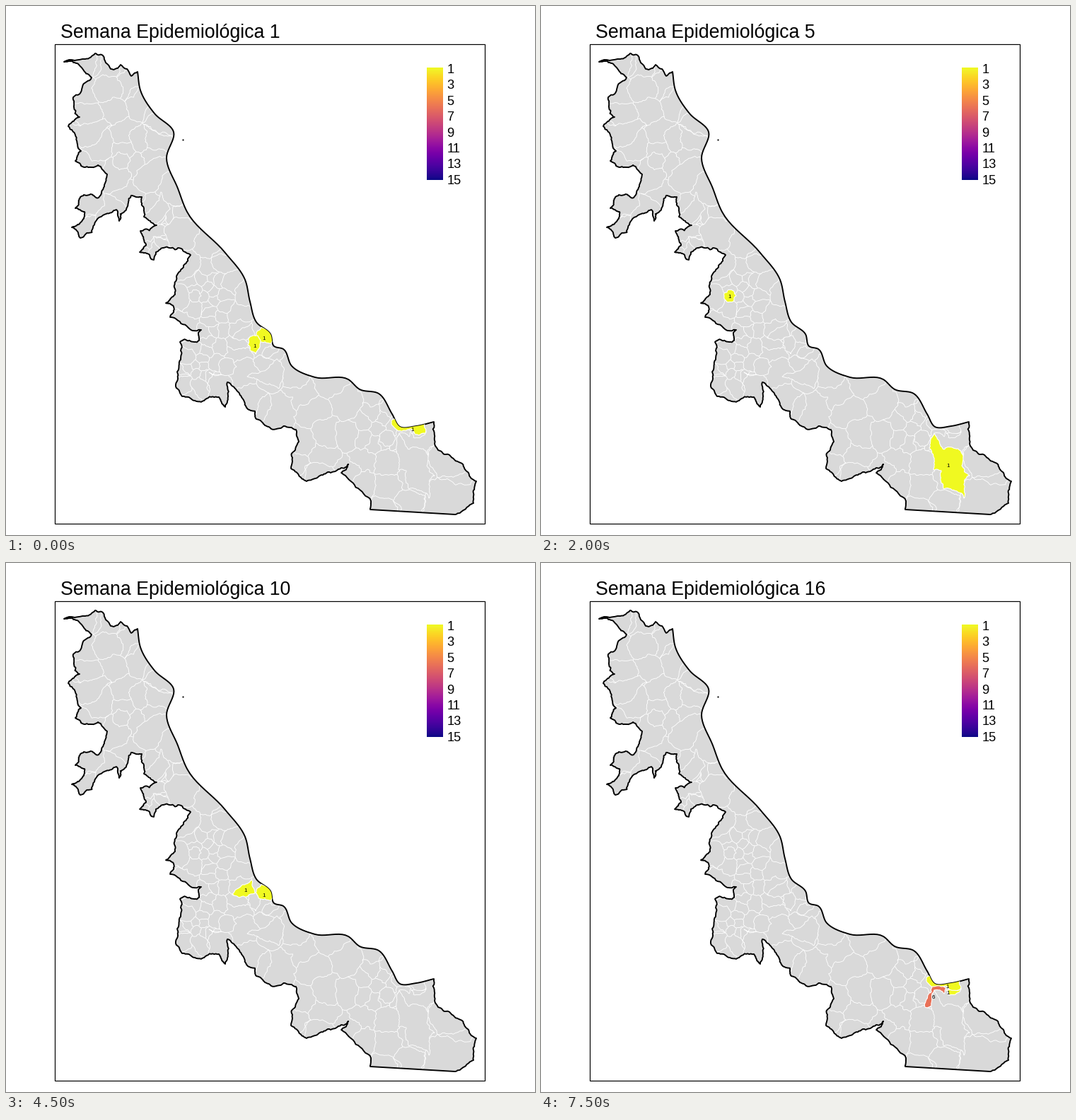
Recreate the animation shown at these times as a matplotlib script. Size 748 by 748 pixels, loop 8 s.

```python
import numpy as np
import matplotlib.pyplot as plt
from matplotlib.animation import FuncAnimation
from matplotlib.collections import LineCollection
from matplotlib.patches import Polygon, Rectangle
from matplotlib.path import Path

SIZE, DPI = 748, 100
PX = 72 / DPI
LAND = "#d9d9d9"
rng = np.random.default_rng(12)
scale = plt.get_cmap("plasma_r")

fig = plt.figure(figsize=(SIZE / DPI, SIZE / DPI), dpi=DPI, facecolor="white")
ax = fig.add_axes([0, 0, 1, 1])
ax.axis("off")


def points(xy):
    return np.reshape(xy, (-1, 2)).astype(float)


def rough(k, *xy):
    """Polyline broken up by random midpoint displacement."""
    p = points(xy)
    while np.hypot(*np.diff(p, axis=0).T).max() > 4:
        d = np.diff(p, axis=0)
        shift = np.clip(rng.normal(0, k, (len(d), 1)), -2 * k, 2 * k)
        mid = p[:-1] + d / 2 + shift * d[:, ::-1] * [-1, 1]
        p = np.insert(p, np.arange(1, len(p)), mid, axis=0)
    return p


def smooth(*xy):
    """Cubic curve through the points, ten steps per span."""
    p = points(xy)
    t = np.r_[0, np.cumsum(np.hypot(*np.diff(p, axis=0).T))]
    m = np.gradient(p, t, axis=0)
    u = np.linspace(0, 1, 10, endpoint=False)[:, None]
    spans = []
    for i, h in enumerate(np.diff(t)):
        spans.append((1 + 2 * u) * (1 - u)**2 * p[i] + u * (1 - u)**2 * h * m[i]
                     + u**2 * (3 - 2 * u) * p[i + 1] + u**2 * (u - 1) * h * m[i + 1])
    return np.vstack(spans)


def text(x, y, s, px, **kw):
    return ax.text(x, y, s, fontsize=px * PX, family="Liberation Sans",
                   color="black", **kw)


# State outline, clockwise from the north-west tip
north = rough(0.1, 82, 79, 112, 75, 126, 67, 137, 70, 148, 89, 162, 83,
              177, 99, 186, 93)
gulf = smooth(186, 93, 190, 119, 210, 152, 237, 178, 227, 215, 243, 258,
              256, 291, 310, 349, 338, 387, 345, 418, 354, 447, 374, 464,
              379, 481, 392, 485, 404, 509, 437, 525, 484, 528, 500, 542,
              527, 548, 546, 577, 557, 595, 580, 594, 605, 588)
east = rough(0.08, 605, 588, 611, 628, 645, 647, 665, 672, 661, 703, 635, 719)
south = rough(0.08, 515, 712, 516, 700, 474, 660, 484, 648, 455, 659, 425, 672,
              403, 654, 414, 616, 410, 599, 375, 598, 353, 583, 352, 573,
              340, 568, 332, 551, 313, 532)
centre = rough(0.1, 313, 532, 310, 567, 301, 553, 267, 558, 240, 535, 247, 500,
               246, 475, 273, 473, 276, 458, 232, 440, 237, 425, 226, 420,
               239, 408, 241, 382, 261, 352)
west = rough(0.1, 261, 352, 231, 342, 222, 342, 209, 359, 189, 348, 198, 338,
             190, 318, 213, 310, 195, 298, 192, 270, 177, 268, 170, 288,
             160, 304, 156, 288, 128, 303, 105, 328, 93, 313, 104, 308,
             111, 291, 98, 286, 110, 267, 131, 271, 143, 238, 130, 225,
             112, 228, 98, 219, 106, 205, 88, 170, 104, 157, 95, 129,
             121, 101, 103, 83, 82, 79)
outline = np.vstack([north, gulf, east, south, centre, west])
state = Polygon(outline, fc=LAND, ec="none", zorder=1)
ax.add_patch(state)
ax.add_patch(Polygon(outline, fc="none", ec="black", lw=1.9 * PX,
                     joinstyle="round", zorder=3))
ax.plot([249.7], [189], "o", ms=2.2 * PX, mfc="black", mec="none")


# Municipal borders: cells around scattered seats, denser near old towns
def spacing(p):
    gap = 29 + 20 * np.exp(-((p[0] - 630) / 55)**2)
    for x, y, r, least in ((190, 205, 30, 13), (207, 341, 18, 8),
                           (285, 405, 45, 9), (300, 462, 38, 10),
                           (268, 514, 36, 8), (525, 598, 45, 14)):
        near = np.exp(-(((p[0] - x)**2 + (p[1] - y)**2) / r**2)**2)
        gap += (least - gap) * near
    return gap


def scatter_seats(tries=7000):
    spots = rng.uniform(outline.min(0), outline.max(0), (tries, 2))
    seats = []
    for p in spots[Path(outline).contains_points(spots)]:
        if not seats or np.hypot(*(np.array(seats) - p).T).min() > spacing(p):
            seats.append(p)
    return np.array(seats)


def cell(p, others):
    """Clip a square around p by the bisector to each neighbour."""
    poly = [p + 60 * np.array(c) for c in ((-1, -1), (1, -1), (1, 1), (-1, 1))]
    for q in others:
        side = [(v - (p + q) / 2) @ (q - p) for v in poly]
        cut = []
        for k, v in enumerate(poly):
            w, s, t = poly[k - 1], side[k], side[k - 1]
            if s * t < 0:
                cut.append(w + (v - w) * t / (t - s))
            if s <= 0:
                cut.append(v)
        poly = cut
    return poly


def cell_borders(seats):
    seen, borders = set(), []
    for p in seats:
        order = np.argsort(np.hypot(*(seats - p).T))
        poly = cell(p, seats[order[1:25]])
        for k, v in enumerate(poly):
            key = tuple(np.round((v + poly[k - 1]) / 2).astype(int))
            if key not in seen:
                seen.add(key)
                borders.append(rough(0.13, poly[k - 1], v))
    return borders


lines = LineCollection(cell_borders(scatter_seats()), colors="white",
                       linewidths=0.85 * PX, zorder=2)
ax.add_collection(lines)
lines.set_clip_path(state)

# Municipalities that report cases
towns = {}


def town(name, x, y, *xy):
    shape = Polygon(rough(0.1, *xy, *xy[:2]), ec="white", joinstyle="round")
    ax.add_patch(shape)
    shape.set_clip_path(state)
    label = text(x, y, "", 8, ha="center", va="center_baseline", zorder=6)
    towns[name] = shape, label


def round_town(name, x, y, r):
    a = np.arange(7) * 2 * np.pi / 7
    town(name, x, y, *np.c_[x + r * np.cos(a), y + r * np.sin(a)].ravel())


town("port", 365, 469, 353, 466, 361, 454, 382, 463, 375, 477, 357, 474)
town("inland", 351.5, 480, 343, 470, 356, 466, 360, 474, 353, 492, 345, 487)
town("spit", 376.5, 478, 374, 473, 382, 468, 382, 483, 376, 484)
town("ridge", 338.5, 462, 320, 468, 333, 456, 347, 448, 352, 467, 330, 473)
town("plain", 371, 522, 341, 524, 371, 512, 383, 499, 393, 512, 386, 541, 358, 530)
town("basin", 576, 650, 556, 605, 570, 627, 590, 626, 597, 636, 595, 650,
     606, 664, 599, 670, 598, 696, 588, 686, 570, 683, 566, 657, 555, 656, 549, 625)
town("bay", 575, 598.5, 545, 586, 596, 584, 594, 603, 580, 606, 571, 598, 550, 597)
town("creek", 575.5, 607, 573, 604, 594, 601, 591, 607, 576, 610)
town("bend", 555, 613, 553, 599, 573, 602, 570, 609, 556, 604, 552, 626,
     543, 628, 547, 611)
town("wedge", 225, 305, 226, 296, 230, 309, 219, 309)
town("sierra", 218, 337, 208, 326, 228, 331, 231, 339, 219, 350, 215, 340)
town("valley", 214, 289, 219, 263, 223, 275, 232, 287, 213, 310, 194, 297, 208, 284)
town("west", 116, 178.5, 84, 165, 112, 166, 140, 159, 150, 169, 134, 186,
     117, 199, 97, 197)
town("strip", 296, 520.5, 287, 518, 307, 521, 296, 523)
round_town("hollow", 539, 611, 12)
round_town("hill", 267, 410, 9)
round_town("ford", 313, 510, 13)
round_town("grove", 163, 219, 13)

weeks = [
    dict(port=1, inland=1, bay=1),
    dict(plain=1),
    dict(port=1),
    dict(wedge=1, sierra=1, plain=1),
    dict(basin=1, hill=1),
    dict(ford=1),
    dict(spit=1, bay=1, bend=1, basin=1),
    dict(port=1, bay=1, bend=1, basin=1, hollow=1),
    dict(basin=1),
    dict(ridge=1, port=1),
    dict(port=1, strip=1, bay=1, bend=1),
    dict(wedge=1, port=1, bay=1, basin=1),
    dict(port=1, bend=1),
    dict(west=1, valley=1, strip=1, bay=1, creek=1),
    dict(grove=1, bay=1),
    dict(bay=1, creek=1, bend=6),
]

# Frame, title and legend
ax.add_patch(Rectangle((69.5, 54.5), 608, 678, fc="none", ec="black",
                       lw=1.2 * PX, snap=False))
title = text(77.3, 44.5, "", 26.7, va="baseline")
ax.imshow(np.linspace(0, 1, 159)[:, None], cmap=scale, aspect="auto",
          extent=(595, 617.5, 246, 87), interpolation="bilinear", zorder=2)
for k in range(8):
    text(623.5, 94.7 + 22.45 * k, str(2 * k + 1), 18.3, va="baseline")
ax.set_xlim(0, SIZE)
ax.set_ylim(SIZE, 0)


def update(i):
    title.set_text(f"Semana Epidemiológica {i + 1}")
    for name, (shape, label) in towns.items():
        count = weeks[i].get(name, 0)
        shape.set_facecolor(scale((count - 1) / 14) if count else LAND)
        shape.set_linewidth((1.1 if count else 0.85) * PX)
        shape.set_zorder(4 if count else 2.5)
        label.set_text(str(count) if count else "")
    return []


anim = FuncAnimation(fig, update, frames=len(weeks), interval=500,
                     repeat=True, repeat_delay=0)
plt.show()
```
